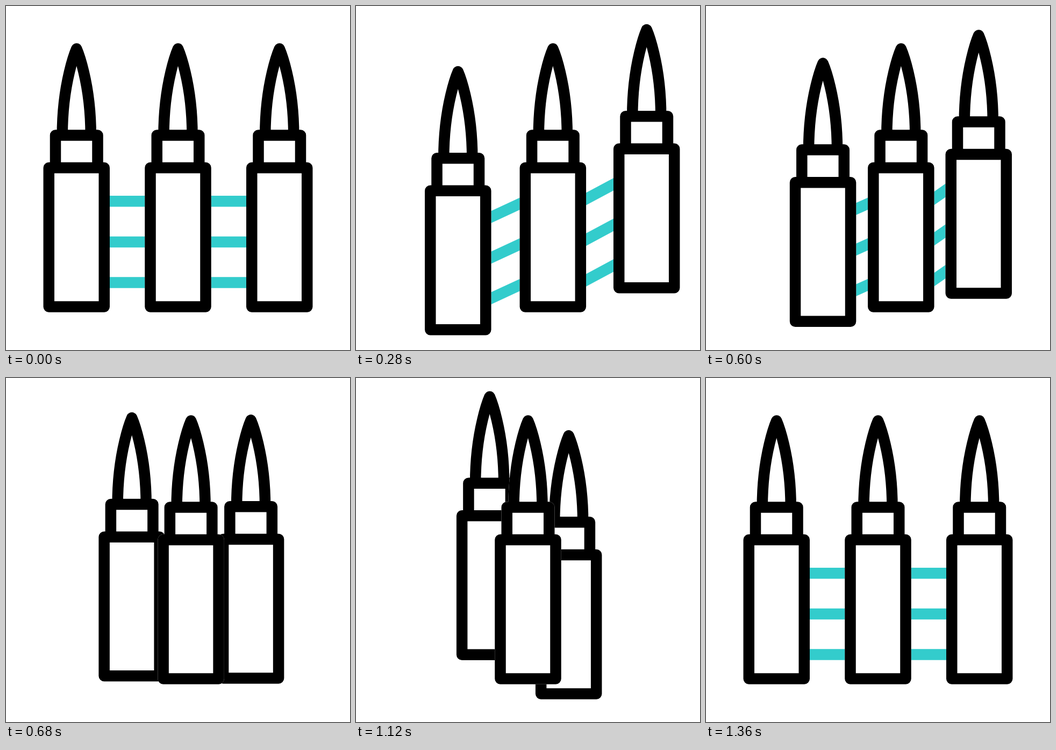
An HTML page with a canvas for the animation above (1480 ms loop, 640 by 640 pixels).

```html
<!DOCTYPE html>
<html lang="en">
<head>
<meta charset="utf-8">
<title>Cartridges</title>
<style>
  html, body { margin: 0; width: 100%; height: 100%; overflow: hidden; background: #fff; }
  canvas { display: block; width: 100%; height: 100%; }
</style>
</head>
<body>
<canvas id="stage" width="640" height="640"></canvas>
<script>
const ctx = document.getElementById('stage').getContext('2d');
const LOOP = 1480, STEP = 40, LINE = 20.5;
const CENTERS = [131.25, 320, 508.75];
const HALF = 61.75;
const BAR_Y = [363.3, 438.9, 514.5];

// Offsets [dx, dy] of the left, middle and right cartridge
const ROW = [[0, 0], [0, 0], [0, 0]];
const RISING = [[73, 53.2], [57.8, 0], [39.9, -44.1]];
const STACKED = [[124.3, -47.4], [0, 0], [-119.7, 29.5]];

const MOVES = [
  { start: 80, end: 360, from: ROW, to: RISING },
  { start: 480, end: 840, from: RISING, to: STACKED },
  { start: 1080, end: 1360, from: STACKED, to: ROW }
];

const ease = p => p * p * (3 - 2 * p);

function poseAt(t) {
  const move = MOVES.filter(m => t >= m.start).pop();
  if (!move) return ROW;
  const k = ease(Math.min(1, (t - move.start) / (move.end - move.start)));
  return move.from.map((a, i) => a.map((v, j) => v + (move.to[i][j] - v) * k));
}

function makeCartridge() {
  const path = new Path2D();
  path.moveTo(-26.5, 240.5);
  path.bezierCurveTo(-26.5, 140, 0, 79.5, 0, 79.5);
  path.bezierCurveTo(0, 79.5, 26.5, 140, 26.5, 240.5);
  path.closePath();
  path.rect(-39.25, 240.5, 78.5, 60.6);
  path.rect(-51.5, 301.1, 103, 258.5);
  return path;
}
const cartridge = makeCartridge();

function drawCartridge(x, y) {
  ctx.save();
  ctx.translate(x, y);
  ctx.fillStyle = ctx.strokeStyle = '#fff';
  ctx.fill(cartridge);
  ctx.stroke(cartridge);
  ctx.strokeStyle = '#000';
  ctx.stroke(cartridge);
  ctx.restore();
}

// Bars run from inside one body to inside the next
function drawBars(x1, dy1, x2, dy2) {
  ctx.strokeStyle = '#33cccc';
  ctx.beginPath();
  for (const y of BAR_Y) {
    ctx.moveTo(x1, y + dy1);
    ctx.lineTo(x2, y + dy2);
  }
  ctx.stroke();
}

function draw(t) {
  const pose = poseAt(t);
  const xs = CENTERS.map((c, i) => c + pose[i][0]);
  const ys = pose.map(p => p[1]);
  ctx.fillStyle = '#fff';
  ctx.fillRect(0, 0, 640, 640);
  ctx.lineWidth = LINE;
  ctx.lineJoin = 'round';
  drawBars(xs[0] + HALF - 29, ys[0], xs[1] - HALF + 10, ys[1]);
  drawBars(xs[1] + HALF - 8, ys[1], xs[2] - HALF + 7, ys[2]);
  for (const i of [0, 2, 1]) drawCartridge(xs[i], ys[i]);
}

const begin = performance.now();
function tick() {
  const t = (performance.now() - begin) % LOOP;
  draw(Math.floor(t / STEP) * STEP);
  requestAnimationFrame(tick);
}
tick();
</script>
</body>
</html>
```
